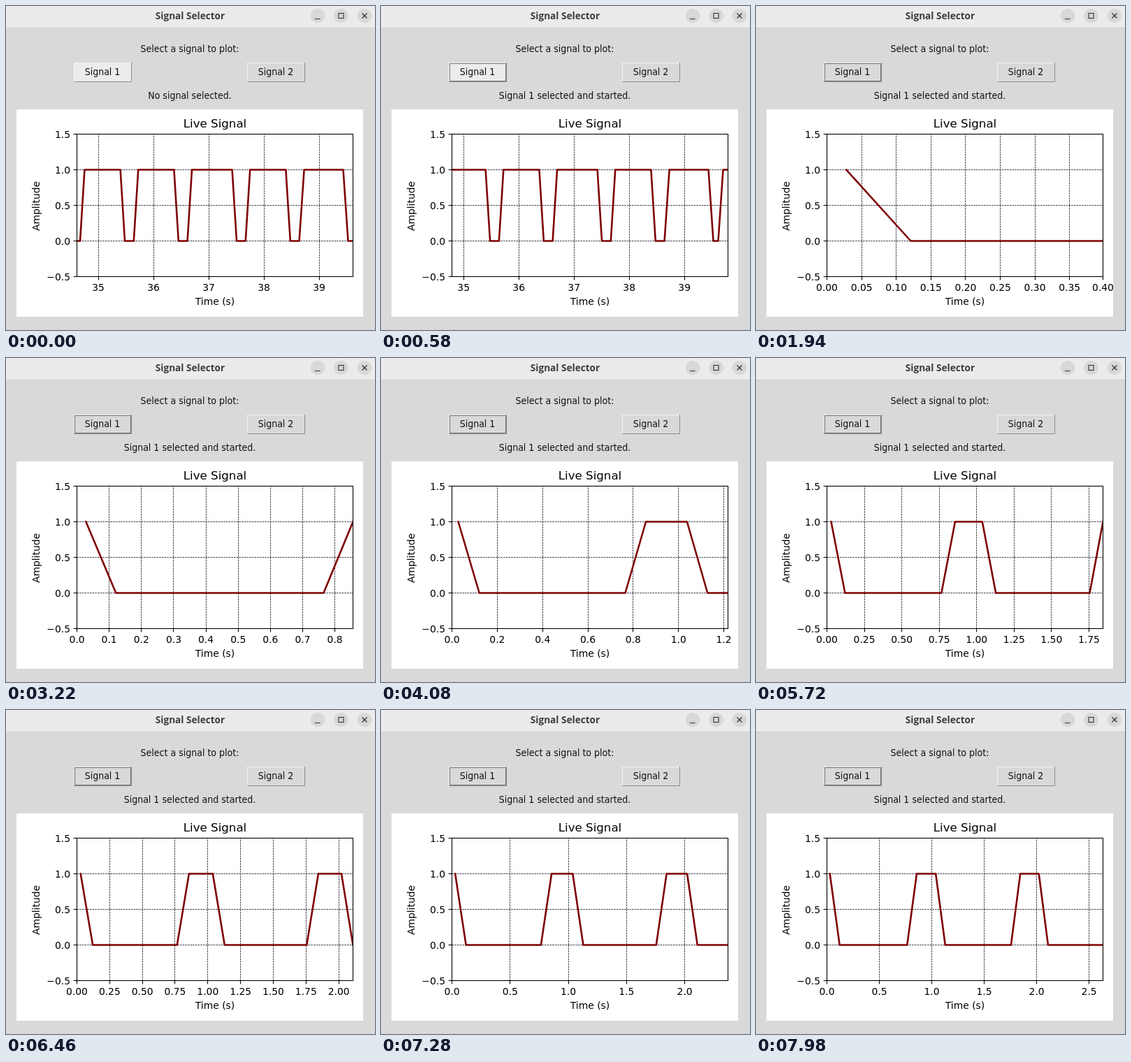
These frames come from a looping animation (528x464 px, 8000 ms). An HTML page with a canvas:

```html
<!DOCTYPE html>
<html lang="en">
<head>
<meta charset="utf-8">
<title>Signal Selector</title>
<style>
html, body { margin: 0; width: 100%; height: 100%; overflow: hidden; background: #d9d9d9; }
canvas { display: block; width: 528px; height: 464px; }
</style>
</head>
<body>
<canvas id="stage" width="528" height="464"></canvas>
<script>
const ctx = document.getElementById('stage').getContext('2d');
const LOOP = 8000;
const PLOT_FONT = '"DejaVu Sans", sans-serif';
const UI_FONT = '14px "DejaVu Sans Condensed", "Noto Sans", sans-serif';
const BG = '#d9d9d9', LIGHT = '#ebebeb', INK = '#111';
const AX = { l: 101.5, r: 496.5, t: 183.5, b: 387.5 };

// A square wave of period 1 s that is high for `duty` seconds after each `rise`.
const square = (rise, duty) => t => +((t - rise + 1) % 1 < duty);

const before = {
  time: k => 34.67 + 0.081 * k + 0.0075 * Math.max(0, k - 49),
  level: square(0.68, 0.765),
  first: -2
};
const after = {
  time: k => 0.028 + 0.093 * k - 0.00011 * k * k,
  level: square(0.8, 0.28),
  first: 0
};

const snap = v => Math.floor(v) + 0.5;

function rect(x, y, w, h, color) {
  ctx.fillStyle = color;
  ctx.fillRect(x, y, w, h);
}

function text(str, x, y, font, color = '#000', align = 'center') {
  ctx.font = font;
  ctx.fillStyle = color;
  ctx.textAlign = align;
  ctx.fillText(str, x, y);
}

function path(points, color, width, dash = []) {
  ctx.beginPath();
  points.forEach(([x, y]) => ctx.lineTo(x, y));
  ctx.strokeStyle = color;
  ctx.lineWidth = width;
  ctx.setLineDash(dash);
  ctx.stroke();
  ctx.setLineDash([]);
}

// Screen refreshes come in a 20, 100, 20 ms rhythm.
function refreshAt(ms) {
  const p = ms % 140;
  return 3 * Math.floor(ms / 140) + (p < 20 ? 0 : p < 120 ? 1 : 2);
}

function stateAt(ms) {
  const n = refreshAt(ms);
  const now = n * 0.0172 - 0.243;
  const restarted = now >= after.time(0);
  let last = 60 + Math.min(2, Math.floor((n + 1) / 5));
  if (restarted) {
    last = 0;
    while (after.time(last + 1) <= now) last++;
  }
  return {
    signal: restarted ? after : before,
    last,
    focus: n >= 5,
    hover: n < 26,
    status: n >= 9 ? 'Signal 1 selected and started.' : 'No signal selected.'
  };
}

function titleBar() {
  rect(0, 0, 528, 31, LIGHT);
  rect(0, 31, 528, 1, '#cfcfcf');
  text('Signal Selector', 263.5, 18.5, 'bold 13.6px "Open Sans", "Noto Sans", sans-serif', '#3d3d3d');
  for (const x of [446, 479.5, 513]) {
    ctx.beginPath();
    ctx.arc(x, 14, 10.3, 0, 7);
    ctx.fillStyle = '#d8d8d8';
    ctx.fill();
  }
  const ink = '#3d3d3d';
  path([[442, 18.5], [449.5, 18.5]], ink, 1.2);
  ctx.strokeRect(476, 10.5, 7, 7);
  path([[509.5, 10.5], [516.5, 17.5]], ink, 1.4);
  path([[516.5, 10.5], [509.5, 17.5]], ink, 1.4);
}

function button(label, x, lit, focus) {
  const y = 81, w = 83, h = 28;
  rect(x, y, w, h, lit ? '#ececec' : BG);
  path([[x + 0.5, y + h], [x + 0.5, y + 0.5], [x + w, y + 0.5]], '#f4f4f4', 1);
  path([[x + 0.5, y + h - 0.5], [x + w - 0.5, y + h - 0.5], [x + w - 0.5, y]], '#8c8c8c', 1);
  if (focus) {
    ctx.strokeStyle = '#000';
    ctx.setLineDash([1, 1]);
    ctx.strokeRect(x + 1.5, y + 1.5, w - 3, h - 3);
    ctx.setLineDash([]);
  }
  text(label, x + w / 2 - 0.5, 99, UI_FONT, INK);
}

// Smallest round step that splits the span into at most nine parts.
function tickStep(span) {
  const raw = span / 9;
  const mag = 10 ** Math.floor(Math.log10(raw));
  return [1, 2, 2.5, 5, 10].find(s => s * mag >= raw - 1e-9) * mag;
}

function decimals(step) {
  let d = 0;
  while (Math.abs(step * 10 ** d - Math.round(step * 10 ** d)) > 1e-6) d++;
  return d;
}

function plot({ signal, last }) {
  // The last gridline may sit on the frame itself, so allow a hair of slack.
  const end = signal.time(last), start = Math.max(0, end - 5);
  const slack = (end - start) * 0.006;
  const px = x => AX.l + (x - start) / (end - start) * (AX.r - AX.l);
  const py = y => AX.b - (y + 0.5) / 2 * (AX.b - AX.t);
  const font = '13.89px ' + PLOT_FONT;
  const grid = points => path(points, 'rgba(0,0,20,0.75)', 1, [2.57, 1.11]);

  rect(15, 148, 496, 297, '#fff');

  const step = tickStep(end - start), digits = decimals(step);
  for (let i = Math.ceil(start / step - 1e-6); i * step <= end + slack; i++) {
    const x = Math.min(px(i * step), AX.r), gx = snap(x);
    grid([[gx, AX.b], [gx, AX.t]]);
    path([[gx, AX.b], [gx, AX.b + 4.9]], '#000', 1.1);
    text((i * step).toFixed(digits), x, 408, font);
  }
  for (let v = -0.5; v <= 1.5; v += 0.5) {
    const gy = snap(py(v));
    grid([[AX.l, gy], [AX.r, gy]]);
    path([[AX.l - 4.9, gy], [AX.l, gy]], '#000', 1.1);
    text(v.toFixed(1).replace('-', '\u2212'), 92, py(v) + 5, font, '#000', 'right');
  }

  const points = [];
  for (let k = signal.first; k <= last; k++) {
    const t = signal.time(k);
    points.push([px(t), py(signal.level(t))]);
  }
  ctx.save();
  ctx.beginPath();
  ctx.rect(AX.l, AX.t, AX.r - AX.l, AX.b - AX.t);
  ctx.clip();
  ctx.lineJoin = 'round';
  ctx.lineCap = 'square';
  if (points.length > 1) path(points, '#7f0000', 2.6);
  ctx.restore();

  ctx.strokeStyle = '#000';
  ctx.lineWidth = 1.1;
  ctx.strokeRect(AX.l, AX.t, AX.r - AX.l, AX.b - AX.t);

  text('Live Signal', 299, 174, '16.67px ' + PLOT_FONT);
  text('Time (s)', 299, 428, font);
  ctx.save();
  ctx.translate(48, 286.5);
  ctx.rotate(-Math.PI / 2);
  text('Amplitude', 0, 0, font);
  ctx.restore();
}

function draw(ms) {
  const s = stateAt(ms);
  rect(0, 0, 528, 464, BG);
  titleBar();
  text('Select a signal to plot:', 263, 66, UI_FONT, INK);
  button('Signal 1', 97, s.hover, s.focus);
  button('Signal 2', 345, false, false);
  text(s.status, 263, 132.5, UI_FONT, INK);
  plot(s);
}

const begin = performance.now();
function frame() {
  draw((performance.now() - begin) % LOOP);
  requestAnimationFrame(frame);
}
frame();
</script>
</body>
</html>
```
